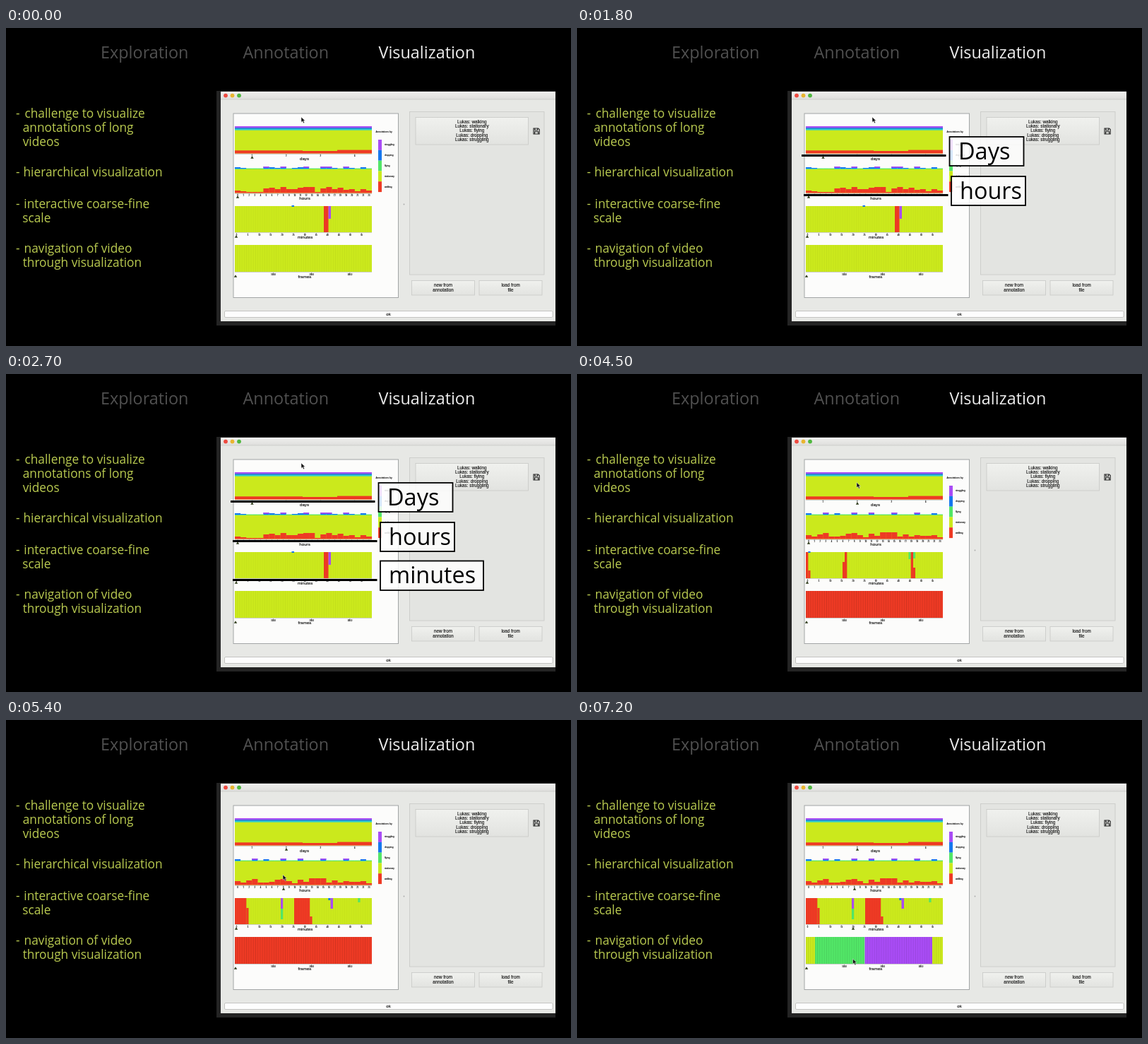
An HTML page that plays this animation: 800 by 450 pixels, repeating every 8 s.

```html
<!DOCTYPE html>
<html lang="en">
<head>
<meta charset="utf-8">
<title>Visualization</title>
<style>
  html, body { margin: 0; width: 100%; height: 100%; overflow: hidden; background: #000; }
  svg { display: block; width: 100vw; height: 100vh; }
  .ui { font-family: "Liberation Sans", Arial, sans-serif; fill: #111; }
  .ui text { stroke: #111; stroke-width: .12; }
  .slide { font-family: "Open Sans", "Noto Sans", sans-serif; }
</style>
</head>
<body>
<svg id="stage" viewBox="0 0 800 450" xmlns="http://www.w3.org/2000/svg">
  <defs>
    <linearGradient id="bar" x2="0" y2="1">
      <stop stop-color="#f0f0ee"/><stop offset="1" stop-color="#dededc"/>
    </linearGradient>
    <linearGradient id="btn" x2="0" y2="1">
      <stop stop-color="#f0f1ee"/><stop offset="1" stop-color="#e2e3e0"/>
    </linearGradient>
    <pattern id="stripes" width="3.23" height="10" patternUnits="userSpaceOnUse" x="324">
      <rect width=".8" height="10" fill="#000" opacity=".13"/>
    </pattern>
  </defs>
  <g id="base"></g>
  <g id="charts"></g>
  <g id="tags"></g>
  <g id="cursor"><path d="M0 0v7.4l1.8-1.6 1.3 2.9 1.4-.6-1.3-2.8h2.3z" fill="#111" stroke="#eee" stroke-width=".5"/></g>
</svg>
<script>
const STEP = 900, LOOP = 8000;
const LEFT = 324, RIGHT = 518, WIDE = RIGHT - LEFT;
const C = { red: '#ee3a24', lime: '#cbe91c', green: '#52e667', blue: '#1677ee', purple: '#a94cf5', cyan: '#2fd3c8' };

const $ = id => document.getElementById(id);
const rect = (x, y, w, h, fill, more = '') =>
  `<rect x="${x}" y="${y}" width="${w}" height="${h}" fill="${fill}" ${more}/>`;
const span = (x1, x2, y1, y2, fill) => rect(x1, y1, x2 - x1, y2 - y1, fill);
const text = (x, y, size, str, more = '') =>
  `<text x="${x}" y="${y}" font-size="${size}" ${more}>${str}</text>`;
const mid = 'text-anchor="middle"';
const range = (n, fn) => Array.from({ length: n }, (_, i) => fn(i)).join('');

function slide() {
  const tabs = [[134, 'Exploration', '#505050'], [335.5, 'Annotation', '#505050'], [527.5, 'Visualization', '#ececec']];
  const lines = [
    [26.5, 126.5, 'challenge to visualize', 1], [23.7, 146.5, 'annotations of long'], [23.7, 166.5, 'videos'],
    [24.5, 210.3, 'hierarchical visualization', 1],
    [25.3, 254.7, 'interactive coarse-fine', 1], [23.2, 274.7, 'scale'],
    [25.6, 317.8, 'navigation of video', 1], [23.7, 337.8, 'through visualization']
  ];
  return `<g class="slide">` +
    tabs.map(([x, s, c]) => text(x, 43.4, 23.4, s, `fill="${c}"`)).join('') +
    `<g fill="#b9ca50">` +
    lines.map(([x, y, s, dash]) => (dash ? text(14, y, 17.3, '-') : '') + text(x, y, 17.3, s)).join('') +
    `</g></g>`;
}

function button(x, y, w, h, rows) {
  return rect(x, y, w, h, 'url(#btn)', 'stroke="#c8c9c6" stroke-width=".8"') +
    rows.map((s, i) => text(x + w / 2, y + h / 2 + 1.7 + (i - (rows.length - 1) / 2) * 6.2, 6.3, s, mid)).join('');
}

function legend() {
  const keys = [['struggling', 'purple'], ['dropping', 'blue'], ['flying', 'green'], ['stationary', 'lime'], ['walking', 'red']];
  return text(523.5, 147.8, 3.5, 'Annotations by') +
    keys.map(([s, c], i) => rect(527, 158 + i * 14.8, 5, 14.9, C[c]) +
      text(536, 166.4 + i * 14.8, 3.2, s)).join('');
}

function axes() {
  const titles = [['days', 422.5, 187], ['hours', 423, 242.5], ['minutes', 423.5, 298], ['frames', 423, 354]];
  const tick = (x, y, s) => rect(x - .25, y, .5, 1.3, '#555') + text(x, y + 3.8, 2.6, s, mid);
  return titles.map(([s, x, y]) => text(x, y, 6.2, s, mid)).join('') +
    [178, 234, 289.5, 345.5].map(y => rect(LEFT, y, WIDE, .4, '#888')).join('') +
    range(4, i => tick(348.3 + i * 48.5, 178.5, i + 1)) +
    range(24, i => tick(LEFT + (i + .5) * WIDE / 24, 234.3, i)) +
    range(12, i => tick(326.5 + i * 16.1, 290, i * 5)) +
    range(3, i => tick(378.5 + i * 54.2, 346, (i + 1) * 100 + '.0'));
}

function appWindow() {
  const lights = [['#ee4a40', 311], ['#e9b52f', 320.5], ['#4fb83f', 330]];
  const acts = ['walking', 'stationary', 'flying', 'dropping', 'struggling'];
  return rect(298, 89, 480, 332, '#242424') +
    rect(304, 90, 474, 325, '#e7e8e5') +
    rect(304, 90, 474, 11, 'url(#bar)') + rect(304, 100.6, 474, .8, '#c8c8c6') +
    lights.map(([c, x]) => `<circle cx="${x}" cy="95.6" r="2.9" fill="${c}"/>`).join('') +
    `<g class="ui">` +
    rect(322, 121, 233.5, 260.5, '#fcfcfb', 'stroke="#a2a5a6" stroke-width="1"') +
    rect(571.5, 118.5, 190.5, 230.5, '#e3e4e1', 'stroke="#cdcecb" stroke-width="1"') +
    button(580, 126.5, 159.5, 38.5, acts.map(a => 'Lukas: ' + a)) +
    button(574.5, 357.5, 89, 20.5, ['new from', 'annotation']) +
    button(670, 357.5, 89, 20.5, ['load from', 'file']) +
    `<path d="M747 142h6.6l1.6 1.6v6.4h-8.2zM748.8 142.2v2.6h3.8v-2.6M748.6 150v-3.2h5v3.2" fill="none" stroke="#222" stroke-width="1.1"/>` +
    `<circle cx="563.5" cy="249.5" r=".9" fill="#aaa"/>` +
    rect(309.5, 400.5, 464.5, 9, '#fdfdfd', 'rx="1.5" stroke="#b9b9b7" stroke-width=".8"') +
    text(541.5, 407, 6.2, 'ok', mid) + legend() + axes() + `</g>`;
}

function days() {
  return span(LEFT, RIGHT, 139, 177.5, C.lime) +
    rect(LEFT, 139, WIDE, 2.4, C.purple) + rect(LEFT, 141.2, WIDE, 1.7, C.blue) + rect(LEFT, 142.9, WIDE, 1.8, C.cyan) +
    span(LEFT, 420, 173.3, 177.5, C.red) + span(420, 469, 174, 177.5, C.red) + span(469, RIGHT, 172.6, 177.5, C.red);
}

// One digit per hour: height of the walking bar, and of the cap above the chart.
function hours(walk, caps) {
  const w = WIDE / 24;
  return rect(LEFT, 199, WIDE, 34.5, C.lime) + range(24, i => {
    const x = LEFT + i * w, cap = +caps[i], h = +walk[i] + .5;
    return rect(x, 198.6, w, 1.2, cap ? C.cyan : C.green) +
      (cap ? rect(x, 199 - cap, w, cap, C.blue) : '') +
      (cap > 2 ? rect(x, 199 - cap, w, 1.8, C.purple) : '') +
      rect(x, 233.5 - h, w + .1, h, C.red);
  });
}

const minutes = parts => span(LEFT, RIGHT, 252, 289, C.lime) +
  parts.map(([x1, x2, y1, y2, c]) => span(x1, x2, y1, y2, C[c])).join('') +
  `<g opacity=".2">${rect(LEFT, 252, WIDE, 37, 'url(#stripes)')}</g>`;

const frames = (parts, shade) =>
  parts.map(([x1, x2, c]) => span(x1, x2, 307, 345, C[c])).join('') +
  `<g opacity="${shade}">${rect(LEFT, 307, WIDE, 38, 'url(#stripes)')}</g>`;

const marker = (x, y) => `<path d="M${x - 2.2} ${y + 1.8}h4.4l-2.2-3.6z" fill="#2c3a18"/>`;

const hoursA = hours('321116758557881685745253', '210003213012300331031020');
const hoursB = hours('536833478527499936354452', '200302003003000300030020');
const minA = minutes([
  [404.5, 408, 251, 253, 'blue'], [450, 456.5, 252, 289, 'red'], [456.5, 460, 252, 270, 'purple']
]);
const minB = minutes([
  [324, 327.3, 252, 289, 'red'], [327.3, 330.5, 278, 289, 'red'], [327.3, 330.5, 251, 253, 'blue'],
  [376, 379, 266, 289, 'red'], [379, 382.3, 252, 289, 'red'],
  [469.5, 472.7, 252, 262, 'green'], [472.7, 476, 252, 289, 'red'],
  [476, 479, 252, 261, 'green'], [476, 479, 274, 289, 'red']
]);
const minC = minutes([
  [324, 340.3, 252, 289, 'red'], [340.3, 343.5, 266, 289, 'red'],
  [389, 392.2, 252, 267, 'purple'], [389, 392.2, 267, 282, 'green'],
  [408, 430.2, 252, 289, 'red'], [430.2, 433.5, 278, 289, 'red'],
  [456.3, 459.5, 252, 255, 'blue'], [459.5, 463, 252, 267, 'purple'], [498.3, 501.5, 252, 258, 'green']
]);
const still = frames([[LEFT, RIGHT, 'lime']], .3);
const walking = frames([[LEFT, RIGHT, 'red']], .9);
const flying = frames([[LEFT, 337, 'lime'], [337, 407.5, 'green'], [407.5, 503, 'purple'], [503, RIGHT, 'lime']], .7);

const view = (parts, day, hour, minute) => days() + parts.join('') +
  marker(day, 183) + marker(hour, 239) + marker(minute, 295) + marker(325, 351);

const start = view([hoursA, minA, still], 348.5, 328, 326);
const overDay = view([hoursB, minB, walking], 397, 328, 326);
const overHour = view([hoursB, minC, walking], 397, 393, 326);
const overMinute = view([hoursB, minC, flying], 397, 393, 391);

const tagList = [
  ['Days', 318, 180.5, 527.5, 154, 105, 41, 540],
  ['hours', 321, 236.5, 530, 210, 105, 41, 542],
  ['minutes', 321, 291.5, 530, 264.5, 146, 41.5, 542],
  ['frames', 321, 347.5, 530, 321, 130.5, 41.5, 542.3]
].map(([s, lx, ly, x, y, w, h, tx]) =>
  rect(lx, ly - 1.5, 204.5, 3, '#000') +
  rect(x, y, w, h, '#fff', 'fill-opacity=".82" stroke="#000" stroke-width="1.8"') +
  text(tx, y + 31.7, 32.4, s, 'class="slide"'));

// Each step: chart view, number of tags, pointer position.
const steps = [
  ...[0, 1, 2, 3, 4].map(n => [start, n, 418, 126]),
  [overDay, 0, 396, 153.5],
  [overHour, 0, 392, 219],
  [overMinute, 0, 390, 263],
  [overMinute, 0, 390.5, 338]
];

$('base').innerHTML = slide() + appWindow();
let shown = -1;

function draw(ms) {
  const n = Math.floor((ms % LOOP) / STEP);
  if (n === shown) return;
  shown = n;
  const [charts, tags, x, y] = steps[n];
  $('charts').innerHTML = charts;
  $('tags').innerHTML = tagList.slice(0, tags).join('');
  $('cursor').setAttribute('transform', `translate(${x} ${y})`);
}

let t0;
function tick(now) {
  t0 ??= now;
  draw(now - t0);
  requestAnimationFrame(tick);
}
draw(0);
requestAnimationFrame(tick);
</script>
</body>
</html>
```
